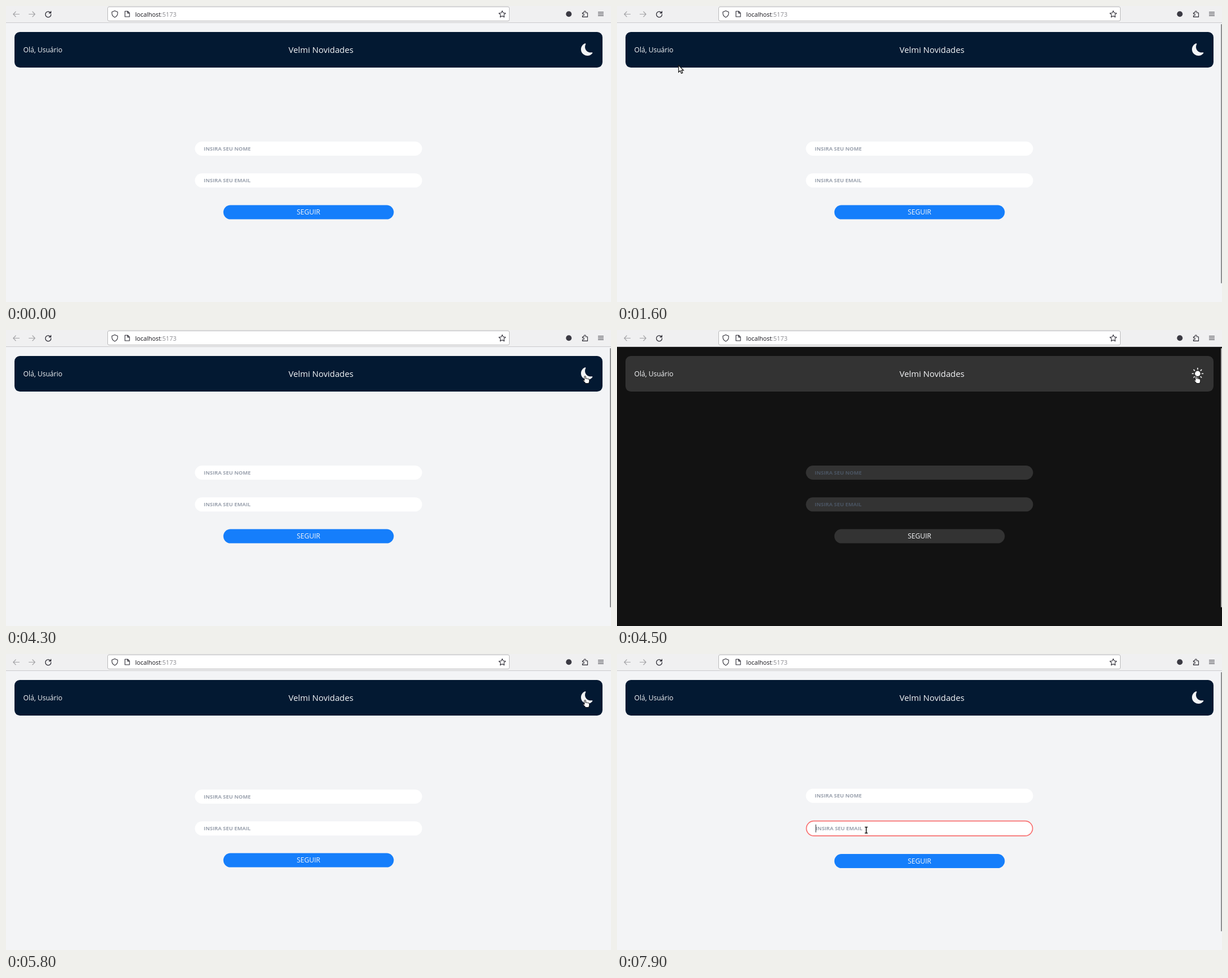
An HTML page for the animation above (8 s loop, 1068x524 px).

```html
<!DOCTYPE html>
<html lang="pt-BR">
<head>
<meta charset="utf-8">
<title>Newsletter</title>
<style>
html, body { margin: 0; width: 100%; height: 100%; overflow: hidden; }
svg { display: block; width: 100%; height: 100%; font-family: "Open Sans", "Noto Sans", sans-serif; }

/* Every change is a hard step on the same 8 s clock. */
.stage, .move, .thumb { animation: 8s step-end -10ms infinite; }
.stage { animation-name: theme, focus, shape; }
.move { animation-name: move; }
.thumb { animation-name: thumb; }

.page { fill: var(--page); }
.header { fill: var(--header); }
.field { fill: var(--field); }
.button { fill: var(--button); }
.thumb { fill: var(--thumb); }
.moon { opacity: var(--moon); }
.sun { opacity: calc(1 - var(--moon)); }
.hint { fill: var(--hint); font-size: 9.36px; font-weight: 700; }
.label { fill: #f5f6f8; font-size: 12.05px; }
.title { font-size: 14.8px; }
.mid { text-anchor: middle; }
.url { fill: #15141a; font-size: 10.8px; }

.name { --on: var(--name-on); transform: translateY(var(--name-y)); }
.email { --on: var(--email-on); transform: translateY(var(--email-y)); }
.submit { transform: translateY(var(--submit-y)); }
.ring { opacity: var(--on); stroke: #f87171; stroke-width: 1.7; }
.caret { opacity: var(--on); fill: #22252b; }
.hint { transform: translateX(calc(var(--on) * 1.6px)); }

.arrow { opacity: var(--arrow); }
.beam { opacity: var(--beam); }
.hand { opacity: var(--hand); }
.icon { fill: none; stroke: #2b2a33; stroke-width: 1.1; stroke-linecap: round; stroke-linejoin: round; }
.off { stroke: #a3a3a6; }

@keyframes theme {
  0%, 72.5%, 100% {
    --page: #f3f4f6; --header: #031932; --field: #fff; --button: #157efb;
    --hint: #9ca3af; --thumb: #8f9092; --moon: 1;
  }
  56.25% {
    --page: #121212; --header: #333; --field: #333; --button: #333;
    --hint: #4b5563; --thumb: #b0b0b0; --moon: 0;
  }
}
@keyframes focus {
  0%, 100% { --name-on: 0; --email-on: 0; --name-y: 0px; --email-y: 0px; --submit-y: 0px; }
  86.25% { --name-on: 1; --email-on: 0; --name-y: 0px; --email-y: 1.5px; --submit-y: 1.5px; }
  98.75% { --name-on: 0; --email-on: 1; --name-y: -1.5px; --email-y: 0px; --submit-y: 1.5px; }
}
@keyframes shape {
  0%, 100% { --arrow: 0; --beam: 0; --hand: 0; }
  6.25%, 27.5%, 47.5%, 78.75% { --arrow: 1; --beam: 0; --hand: 0; }
  23.75%, 37.5%, 85% { --arrow: 0; --beam: 1; --hand: 0; }
  51.25% { --arrow: 0; --beam: 0; --hand: 1; }
}
@keyframes thumb {
  0%, 72.5% { opacity: 0; }
  6.25% { opacity: 1; }
  70% { opacity: .55; }
  71.25% { opacity: .2; }
  78.75% { opacity: .6; }
  80%, 100% { opacity: 1; }
}
@keyframes move {
  0%, 6.25% { transform: translate(660px, 170px); }
  7.5% { transform: translate(560px, 125px); }
  8.75% { transform: translate(489px, 100px); }
  10% { transform: translate(545px, 95px); }
  11.25% { transform: translate(615px, 88px); }
  16.25% { transform: translate(480px, 88px); }
  17.5% { transform: translate(330px, 93px); }
  18.75% { transform: translate(190px, 100px); }
  20% { transform: translate(108px, 104px); }
  21.25% { transform: translate(88px, 97px); }
  22.5% { transform: translate(64px, 87px); }
  23.75% { transform: translate(46px, 69px); }
  25% { transform: translate(49px, 72px); }
  27.5% { transform: translate(90px, 96px); }
  28.75% { transform: translate(150px, 125px); }
  30% { transform: translate(225px, 160px); }
  31.25% { transform: translate(300px, 195px); }
  32.5% { transform: translate(355px, 218px); }
  33.75% { transform: translate(375px, 226px); }
  37.5% { transform: translate(430px, 242px); }
  38.75% { transform: translate(463px, 244px); }
  45% { transform: translate(813px, 145px); }
  47.5% { transform: translate(977px, 114px); }
  50% { transform: translate(1000px, 97px); }
  51.25% { transform: translate(1014px, 84px); }
  53.75% { transform: translate(1018px, 81px); }
  78.75% { transform: translate(870px, 160px); }
  80% { transform: translate(705px, 212px); }
  82.5% { transform: translate(600px, 222px); }
  83.75% { transform: translate(500px, 229px); }
  85% { transform: translate(450px, 244px); }
  86.25% { transform: translate(437px, 245px); }
  92.5% { transform: translate(437px, 259px); }
  95% { transform: translate(437px, 284px); }
  96.25%, 100% { transform: translate(437px, 305px); }
}
</style>
</head>
<body>
<svg class="stage" viewBox="0 0 1068 524">
  <defs>
    <rect id="pill" width="401" height="25" rx="12.5"/>
    <rect id="halo" x=".85" y="-.65" width="399.3" height="26.3" rx="13.15"/>
    <rect id="bar" x="17" y="5.5" width="1" height="14"/>
    <path id="ray" d="M0-7.6V-9.6"/>
  </defs>

  <!-- browser bar -->
  <rect width="1068" height="30" fill="#f0f0f1"/>
  <rect y="29" width="1068" height="1" fill="#cbcbcd"/>
  <rect x="179.5" y="1.5" width="709" height="25" rx="2.5" fill="#fff" stroke="#b9b9bb"/>
  <g class="icon">
    <path class="off" d="M23.5 14.5H12.8M17.2 10 12.8 14.5 17.2 19"/>
    <path class="off" d="M40.5 14.5H51.2M46.8 10 51.2 14.5 46.8 19"/>
    <path d="M78.3 11.6A5 5 0 1 0 79.5 15M79.3 9.5V12.5H76.2" stroke-width="1.3"/>
    <path d="M192 8.6 197 10.4V13.5Q196.6 18 192 19.9Q187.4 18 187 13.5V10.4Z"/>
    <path d="M210 9.2H214.8L218 12.4V19H210ZM214.6 9.4V12.6H217.8"/>
    <path d="M876 8.6 877.8 12.3 881.9 12.9 878.9 15.7 879.6 19.7 876 17.8 872.4 19.7 873.1 15.7 870.1 12.9 874.2 12.3Z"/>
    <path d="M1017.6 12H1020.3V10.6A1.6 1.6 0 0 1 1023.5 10.6V12H1026.6V19.4H1017.6V17H1019A1.5 1.5 0 0 0 1019 14H1017.6Z"/>
    <path d="M1045.5 11H1054.5M1045.5 14H1054.5M1045.5 17H1054.5"/>
  </g>
  <circle cx="993.5" cy="14.2" r="5" fill="#3b3a43"/>
  <text class="url" x="228" y="18.5">localhost<tspan fill="#8b8b90">:5173</tspan></text>

  <!-- page -->
  <rect class="page" y="30" width="1068" height="494"/>
  <rect class="header" x="15" y="46" width="1038" height="63" rx="9.5"/>
  <text class="label" x="30.5" y="82">Olá, Usuário</text>
  <text class="label title mid" x="556" y="83.3">Velmi Novidades</text>
  <path class="moon" fill="#f3f4f6" transform="translate(1015 66.2) scale(1.36)" d="M6 .28a.77.77 0 0 1 .08.86A7.2 7.2 0 0 0 5.2 4.6c0 4 3.28 7.27 7.32 7.27.53 0 1.04-.05 1.53-.16a.79.79 0 0 1 .78 1.21A8.35 8.35 0 0 1 8.34 16C3.73 16 0 12.29 0 7.71 0 4.27 2.11 1.31 5.12.06A.75.75 0 0 1 6 .28z"/>
  <g class="sun" transform="translate(1025 77.2)" fill="#fff" stroke="#fff" stroke-width="1.6" stroke-linecap="round">
    <circle r="4.7" stroke="none"/>
    <use href="#ray"/>
    <use href="#ray" transform="rotate(45)"/>
    <use href="#ray" transform="rotate(90)"/>
    <use href="#ray" transform="rotate(135)"/>
    <use href="#ray" transform="rotate(180)"/>
    <use href="#ray" transform="rotate(225)"/>
    <use href="#ray" transform="rotate(270)"/>
    <use href="#ray" transform="rotate(315)"/>
  </g>

  <g transform="translate(333.5 240)">
    <g class="name">
      <use class="field" href="#pill"/>
      <use class="field ring" href="#halo"/>
      <text class="hint" x="15.6" y="15.8">INSIRA SEU NOME</text>
      <use class="caret" href="#bar"/>
    </g>
  </g>
  <g transform="translate(333.5 296.3)">
    <g class="email">
      <use class="field" href="#pill"/>
      <use class="field ring" href="#halo"/>
      <text class="hint" x="15.6" y="15.8">INSIRA SEU EMAIL</text>
      <use class="caret" href="#bar"/>
    </g>
  </g>
  <g class="submit">
    <rect class="button" x="383.7" y="352.6" width="300.8" height="25" rx="12.5"/>
    <text class="label mid" x="534" y="369.2">SEGUIR</text>
  </g>
  <rect class="thumb" x="1066" y="32" width="2" height="459" rx="1"/>

  <!-- pointer -->
  <g class="move">
    <path class="arrow" fill="#fff" stroke="#111" stroke-width="1.2" d="M.7 1V13.2L3.6 10.6 5.6 15.2 7.8 14.3 5.9 9.8H9.4Z"/>
    <g class="beam" fill="none">
      <path stroke="#fff" stroke-width="2.6" d="M.8 1.5H5.2M.8 12H5.2M3 1.5V12"/>
      <path stroke="#111" stroke-width="1.5" d="M.5 1.5H5.5M.5 12H5.5M3 1.5V12"/>
    </g>
    <path class="hand" fill="#fff" stroke="#111" stroke-linejoin="round" d="M3 1.8a1.2 1.2 0 0 1 2.4 0V5.2q1.1-.8 2.2.2 1.2-.6 2.1.4 1.7-.4 2.1 1V9.5q0 1.6-1 3V13.5H4.6V12.3L1 8.8Q.4 7.6 1.6 7.4L3 8.4Z"/>
  </g>
</svg>
</body>
</html>
```
